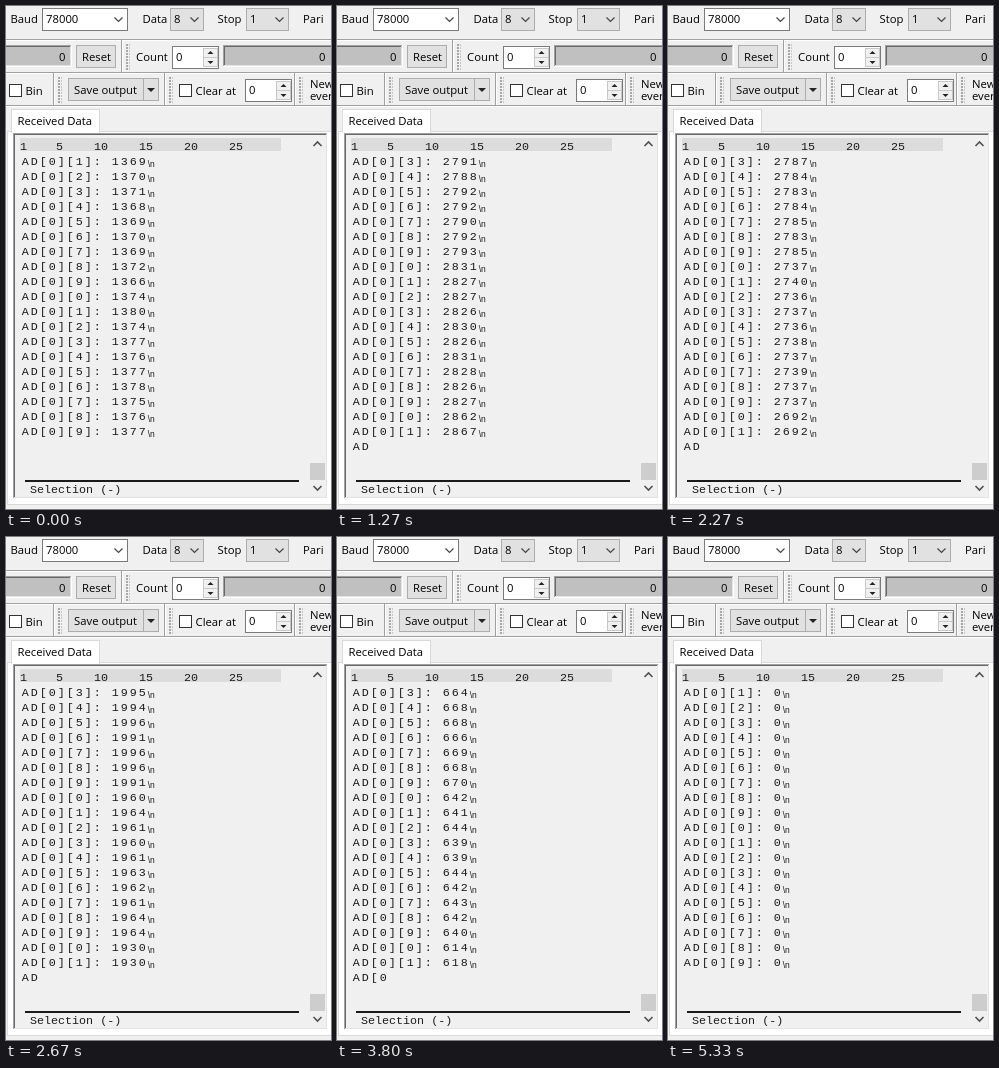
An HTML page that plays this animation: 325 by 503 pixels, repeating every 5.39 s.

```html
<!DOCTYPE html>
<html lang="en">
<head>
<meta charset="utf-8">
<title>Serial terminal</title>
<style>
  html, body { margin: 0; width: 100%; height: 100%; overflow: hidden; background: #f0f0f0; }
  svg { display: block; width: 325px; height: 503px; }
  text { font: 11.3px "Open Sans", "Noto Sans", sans-serif; fill: #000; white-space: pre; }
  text.mono { font: 11.7px "Liberation Mono", monospace; fill: #1a1a1a; }
  #log text { letter-spacing: 1.98px; }
  #log .eol { font: 8.5px "Liberation Sans", sans-serif; letter-spacing: 0; }
  rect { shape-rendering: crispEdges; }
</style>
</head>
<body>
<svg id="stage" viewBox="0 0 325 503"></svg>
<script>
const ROWS = 20, PACKET = 32, GROUPS_PER_STEP = 3;
const LOOP = 5390, STEPS = 81;

// ---- window ----
const rect = (x, y, w, h, fill) =>
  `<rect x="${x}" y="${y}" width="${w}" height="${h}" fill="${fill}"/>`;
const box = (x, y, w, h, fill, edge) =>
  rect(x, y, w, h, edge) + rect(x + 1, y + 1, w - 2, h - 2, fill);
const sunken = (x, y, w, h, fill) =>
  rect(x, y, w, h, '#fff') + rect(x, y, w - 1, h - 1, '#a0a0a0') +
  rect(x + 1, y + 1, w - 2, h - 2, '#e3e3e3') + rect(x + 1, y + 1, w - 3, h - 3, '#696969') +
  rect(x + 2, y + 2, w - 4, h - 4, fill);
const label = (x, y, str, attrs = '') => `<text x="${x}" y="${y}" ${attrs}>${str}</text>`;
const mono = (x, y, str) => label(x, y, str, 'class="mono"');
const chevron = (x, y, dir = 1, stroke = '#444', width = 1.2) =>
  `<path d="M${x - 4} ${y - dir * 2}l4 ${dir * 4}l4 ${-dir * 4}" fill="none" stroke="${stroke}" stroke-width="${width}"/>`;
const triangle = (x, y, dir, w = 3) =>
  `<path d="M${x - w} ${y}h${2 * w}l${-w} ${dir * w}z" fill="#222"/>`;
const button = (x, y, w, h) => box(x, y, w, h, '#e1e1e1', '#adadad');
const combo = (x, w, str, fill, edge) =>
  box(x, 2, w, 23, fill, edge) + label(x + 4, 17, str) + chevron(x + w - 9.5, 13.5);
const spinner = (x, y) =>
  box(x, y, 47, 23, '#fff', '#7a7a7a') + label(x + 4, y + 15, '0') +
  box(x + 31, y + 2, 15, 10, '#f0f0f0', '#c8c8c8') + box(x + 31, y + 11, 15, 10, '#f0f0f0', '#c8c8c8') +
  triangle(x + 38.5, y + 8, -1) + triangle(x + 38.5, y + 15, 1);
const checkbox = (x, str) =>
  box(x, 78, 13, 13, '#fff', '#333') + label(x + 16.5, 89, str);
const divider = y => rect(0, y, 325, 1, '#a0a0a0') + rect(0, y + 1, 325, 1, '#fff');
const grip = (x, y) => {
  let dots = rect(x - 5, y - 4, 1, 32, '#a0a0a0') + rect(x - 4, y - 4, 1, 32, '#fff');
  for (let i = 0; i < 9; i++)
    dots += rect(x, y + i * 3, 2, 2, '#a8a8a8') + rect(x + 3, y + i * 3, 1, 2, '#c8c8c8');
  return dots;
};
const column = n => mono(9 * n + (n < 10 ? 5 : -2), 143.5, n);

const chrome = [
  rect(0, 0, 325, 503, '#f0f0f0'),
  label(4.5, 17, 'Baud'), combo(36, 86, '78000', '#fff', '#7a7a7a'),
  label(136.5, 17, 'Data'), combo(164, 34, '8', '#e1e1e1', '#adadad'),
  label(211.5, 17, 'Stop'), combo(240, 43, '1', '#e1e1e1', '#adadad'),
  label(297, 17, 'Pari'),

  divider(33),
  sunken(-3, 39, 69, 22, '#c0c0c0'), label(53, 55, '0'),
  button(70, 39, 40, 23), label(76, 55, 'Reset'),
  grip(120, 38), label(130, 55, 'Count'), spinner(166, 40),
  sunken(217, 39, 112, 22, '#c0c0c0'), label(313, 55, '0'),

  divider(66),
  checkbox(3, 'Bin'), grip(52, 71),
  button(62, 72, 76, 23), label(68, 88, 'Save output'),
  button(137, 72, 16, 23), triangle(145, 82, 1, 4),
  grip(163, 71), checkbox(173, 'Clear at'), spinner(239, 73),
  grip(293, 71), label(304, 82, 'New'), label(304, 94, 'ever'),
  divider(99),

  box(1, 125, 330, 374, '#fff', '#d9d9d9'),
  box(5, 103, 89, 24, '#fff', '#d9d9d9'), rect(6, 125, 87, 3, '#fff'),
  label(11.5, 119, 'Received Data'),
  sunken(7, 127, 315, 366, '#f0f0f0'),
  rect(14, 132, 261, 13, '#dcdcdc'),
  ...[1, 5, 10, 15, 20, 25].map(column),
  chevron(311.5, 138, -1, '#505050', 1.6), chevron(311.5, 482, 1, '#505050', 1.6),
  rect(304, 457, 15, 17, '#cdcdcd'),
  rect(19, 474, 274, 2, '#1a1a1a'),
  mono(24, 487, 'Selection (-)')
];
const logRows = Array.from({ length: ROWS }, (_, i) => mono(15.8, 159 + i * 15, ''));
const stage = document.getElementById('stage');
stage.innerHTML = chrome.join('') + `<g id="log">${logRows.join('')}</g>`;
const rows = document.getElementById('log').children;

// ---- readings: ten per group ----
// The dial's sweep as a smooth curve through [group, level].
const sweep = [[0, 1377], [32, 1991], [80, 3363], [119, 1962], [170, 641], [190, 110], [202, 0]];

function slope(i) {
  if (i === 0 || i === sweep.length - 1) return 0;
  const [g0, v0] = sweep[i - 1], [g1, v1] = sweep[i + 1];
  return (v1 - v0) / (g1 - g0);
}

function level(group) {
  const i = sweep.findIndex(([g]) => g >= group);
  if (i < 0) return 0;
  if (i === 0) return sweep[0][1] + 8 * group;
  const [g0, v0] = sweep[i - 1], [g1, v1] = sweep[i];
  const span = g1 - g0, u = (group - g0) / span, w = 1 - u;
  return v0 * (1 + 2 * u) * w * w + v1 * u * u * (3 - 2 * u) +
    span * u * w * (slope(i - 1) * w - slope(i) * u);
}

function noise(n) {
  const s = Math.sin(n * 12.9898) * 43758.5453;
  return (s - Math.floor(s)) * 2 - 1;
}

function reading(n) {
  const base = level(Math.floor(n / 10));
  return Math.max(0, Math.round(base + noise(n) * Math.min(3, base / 20)));
}

function groupText(group) {
  let text = '';
  for (let i = 0; i < 10; i++) text += `AD[0][${i}]: ${reading(group * 10 + i)}\n`;
  return text;
}

// Packets of the newest group that have arrived: a slow drift, then alternation.
function packetsAt(step) {
  if (step === 0) return 5;
  if (step < 73) return 1 + Math.max(0, Math.floor((step - 55) / 7.5));
  return step % 2 ? 1 : 5;
}

function linesAt(step) {
  const group = step * GROUPS_PER_STEP;
  const newest = groupText(group).slice(0, packetsAt(step) * PACKET);
  return (groupText(group - 2) + groupText(group - 1) + newest).split('\n').slice(-ROWS);
}

// ---- playback ----
const startOf = step => Math.round(step * 20 / 3) * 10;
let shown = -1;

function draw(now) {
  const t = now % LOOP;
  let step = STEPS - 1;
  while (startOf(step) > t) step--;
  if (step === shown) return;
  shown = step;
  linesAt(step).forEach((line, i) => {
    const eol = i < ROWS - 1 ? '<tspan class="eol" dy="2">\\n</tspan>' : '';
    rows[i].innerHTML = line + eol;
  });
}

const origin = performance.now();
function tick() {
  draw(performance.now() - origin);
  requestAnimationFrame(tick);
}
tick();
</script>
</body>
</html>
```
